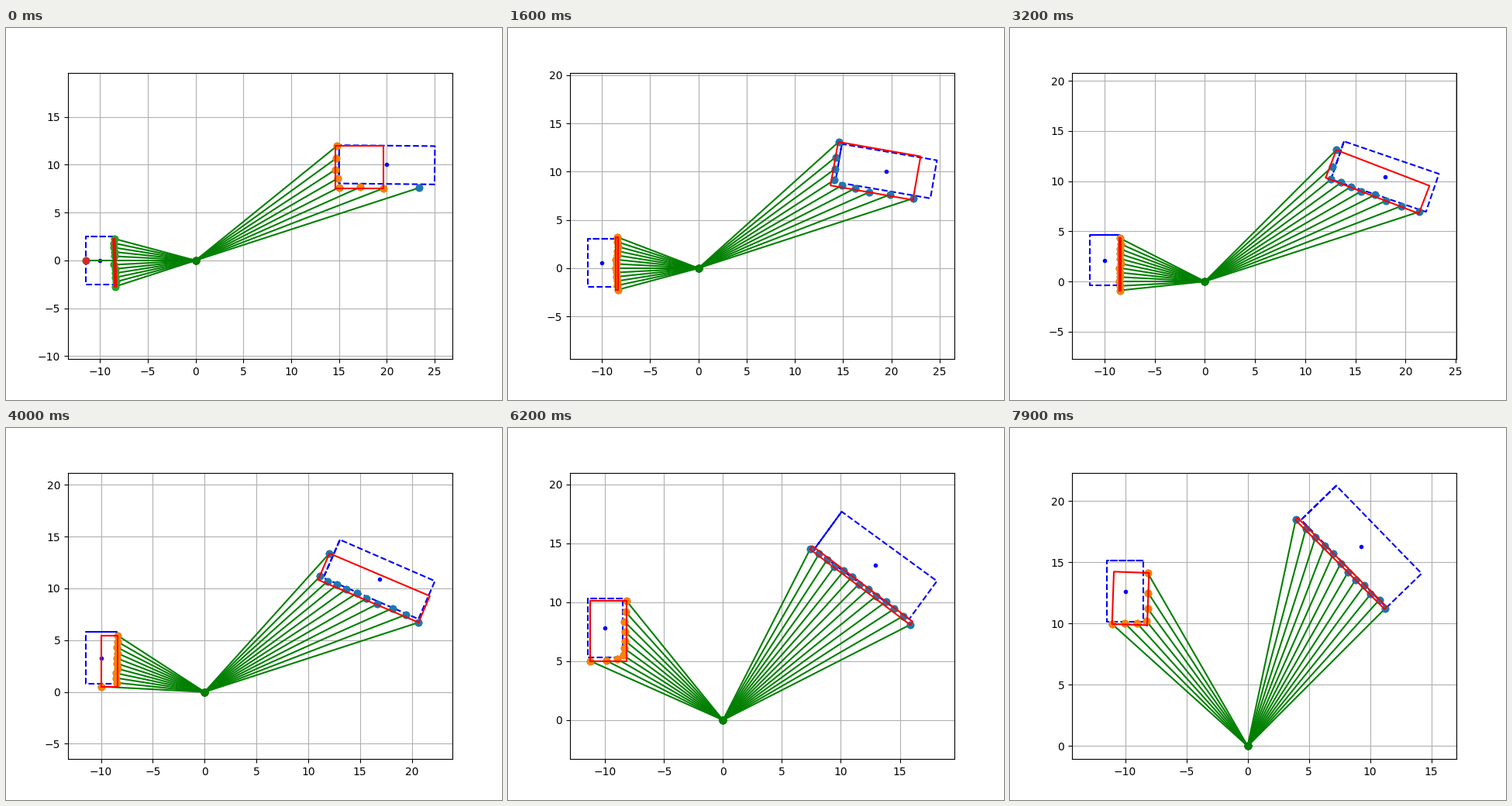
Animation of 640 by 480 pixels, one loop 8000 ms. Source, as a matplotlib script:

```python
"""Lidar scan of two moving vehicles with L-shape rectangle fitting."""
import numpy as np
import matplotlib.pyplot as plt
from matplotlib.animation import FuncAnimation

STEPS = 80
DT = 0.2
ANGLE_RES = np.deg2rad(3.0)
RANGE_NOISE = 0.01
SEARCH_STEP = np.deg2rad(1.0)
SEG_BASE, SEG_GAIN = 3.0, 0.001

rng = np.random.default_rng(7)


class Vehicle:
    def __init__(self, x, y, yaw, width, length):
        self.x, self.y, self.yaw, self.v = x, y, yaw, 0.0
        l, w = length / 2, width / 2
        # The front edge is traced twice: first and last.
        path = np.array([(l, w), (l, -w), (-l, -w), (-l, w), (l, w), (l, -w)])
        t = np.arange(0.0, 1.0, 0.05)[:, None]
        self.outline = np.vstack([(1 - t) * p + t * q
                                  for p, q in zip(path, path[1:])])

    def update(self, accel, omega):
        self.x += self.v * np.cos(self.yaw) * DT
        self.y += self.v * np.sin(self.yaw) * DT
        self.yaw += omega * DT
        self.v += accel * DT

    def contour(self):
        c, s = np.cos(self.yaw), np.sin(self.yaw)
        u, w = self.outline.T
        return u * c + w * s + self.x, u * s - w * c + self.y


def scan(contours):
    """Nearest noisy range per angular bin; negative bins wrap around."""
    ranges = np.full(int(2 * np.pi / ANGLE_RES + 1e-9) + 1, np.inf)
    for x, y in contours:
        noise = rng.uniform(1 - RANGE_NOISE, 1 + RANGE_NOISE, len(x))
        bins = np.rint(np.arctan2(y, x) / ANGLE_RES).astype(int)
        np.minimum.at(ranges, bins, np.hypot(x, y) * noise)
    hit = np.flatnonzero(np.isfinite(ranges))
    t = hit * ANGLE_RES
    return np.column_stack([ranges[hit] * np.cos(t), ranges[hit] * np.sin(t)])


def segment(pts):
    """Group points that are chained together by short gaps."""
    reach = SEG_BASE + SEG_GAIN * np.hypot(*pts.T)
    gap = np.hypot(*(pts[:, None] - pts[None]).transpose(2, 0, 1))
    near = gap <= reach[:, None]
    near |= near.T
    left = set(range(len(pts)))
    groups = []
    while left:
        group, todo = set(), [min(left)]
        while todo:
            i = todo.pop()
            if i not in group:
                group.add(i)
                todo.extend(np.flatnonzero(near[i]))
        left -= group
        groups.append(pts[sorted(group)])
    return groups


def rotated(pts, theta):
    c, s = np.cos(theta), np.sin(theta)
    return pts @ np.array([[c, -s], [s, c]])


def variance_score(proj):
    d = np.minimum(proj.max(0) - proj, proj - proj.min(0))
    first = d[:, 0] < d[:, 1]
    parts = d[first, 0], d[~first, 1]
    return -sum(np.var(p) for p in parts if len(p))


def fit_rect(pts):
    angles = np.arange(0.0, np.pi / 2 - SEARCH_STEP, SEARCH_STEP)
    best = max(angles, key=lambda a: variance_score(rotated(pts, a)))
    proj = rotated(pts, best)
    (x0, y0), (x1, y1) = proj.min(0), proj.max(0)
    box = np.array([(x0, y0), (x1, y0), (x1, y1), (x0, y1), (x0, y0)])
    return rotated(box, -best)


def simulate():
    v1 = Vehicle(-10.0, 0.0, np.pi / 2, 3.0, 5.0)
    v2 = Vehicle(20.0, 10.0, np.pi, 4.0, 10.0)
    states = []
    for _ in range(STEPS):
        v1.update(0.1, 0.0)
        v2.update(0.1, -0.05)
        cars = [(v.x, v.y, v.contour()) for v in (v1, v2)]
        groups = segment(scan([c[2] for c in cars]))
        rects = [fit_rect(g) for g in groups if len(g) > 1]
        states.append((cars, groups, rects))
    return states


states = simulate()
fig, ax = plt.subplots(figsize=(6.4, 4.8), dpi=100)


def draw(i):
    cars, groups, rects = states[i]
    ax.cla()
    ax.axis("equal")
    ax.grid(True)
    ax.plot(0.0, 0.0, "*r")
    for x, y, outline in cars:
        ax.plot(x, y, ".b")
        ax.plot(*outline, "--b")
    for pts in groups:
        for x, y in pts:
            ax.plot([0.0, x], [0.0, y], "-og")
        ax.plot(*pts.T, "o")
    for rect in rects:
        ax.plot(*rect.T, "-r")


anim = FuncAnimation(fig, draw, frames=STEPS, interval=100, repeat=True)
plt.show()
```
